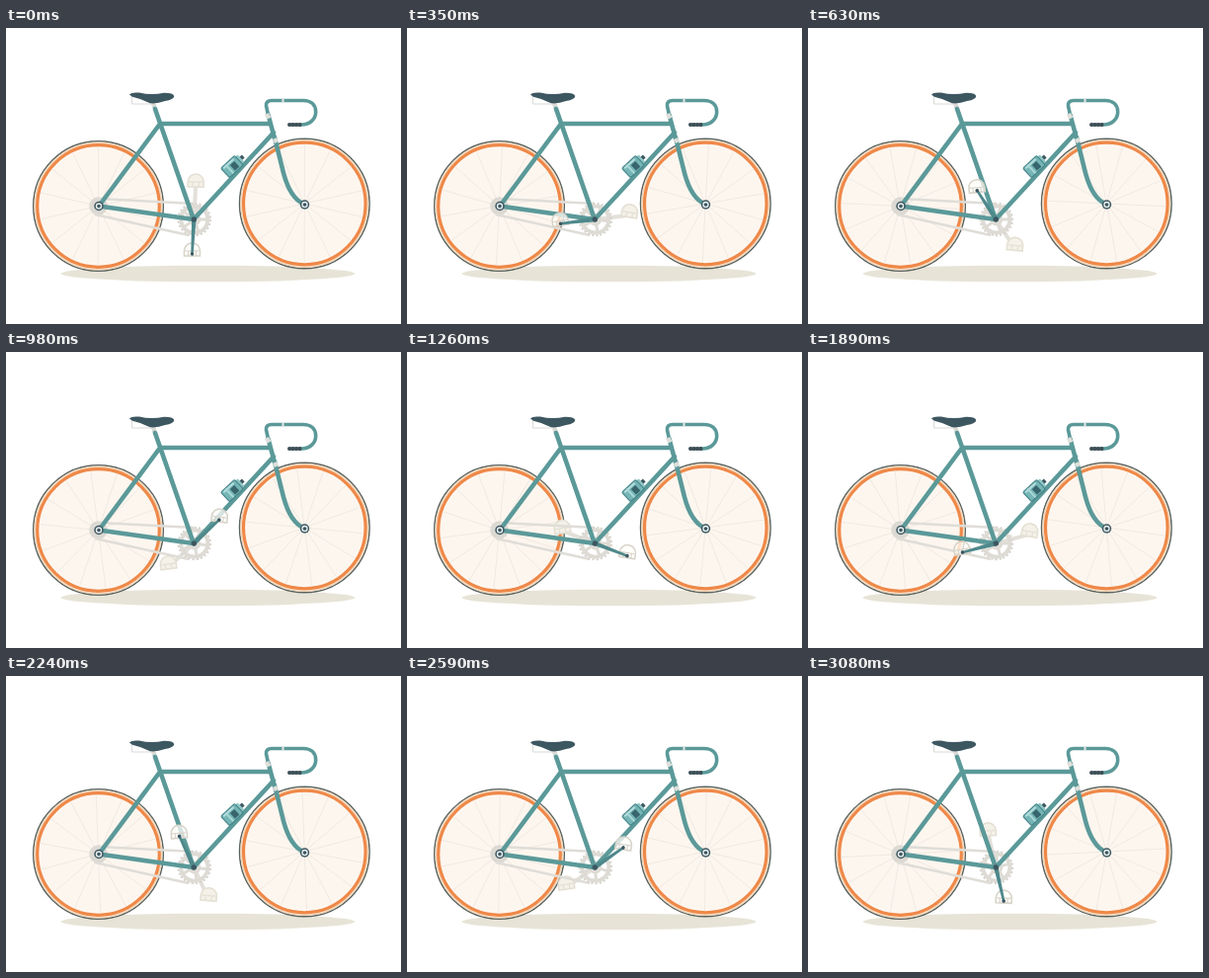
An HTML page that plays this animation: 400 px wide and 300 px high, repeating every 3.15 s.

```html
<!DOCTYPE html>
<html lang="en">
<head>
<meta charset="utf-8">
<title>Bicycle</title>
<style>
html, body { margin: 0; width: 100%; height: 100%; overflow: hidden; background: #fff; }
svg { display: block; width: 100vw; height: 100vh; }
.tube { fill: none; stroke: #5b9999; stroke-width: 4.6; stroke-linecap: round; stroke-linejoin: round; }
.chain { fill: none; stroke: #dfddd7; stroke-width: 2.6; }
.pale { fill: none; stroke: #e3e0da; stroke-width: 4; }
</style>
</head>
<body>
<svg viewBox="0 0 400 300">
  <defs>
    <g id="rim">
      <circle r="65.8" fill="#fdf6ef" stroke="#596360" stroke-width="1.5"/>
      <circle r="64.2" fill="none" stroke="#f3d9bd" stroke-width="1.7"/>
      <circle r="61.8" fill="none" stroke="#ef8848" stroke-width="3.2"/>
    </g>
    <g id="hub">
      <circle r="4.7" fill="#3d5761"/>
      <circle r="2.5" fill="none" stroke="#e8eeee" stroke-width="1.4"/>
    </g>
    <path id="dome" d="M-8 2V-3C-8-8-4-11 0-11S8-8 8-3V2Z"/>
  </defs>

  <ellipse cx="204.5" cy="249" rx="149" ry="8.3" fill="#e7e4d7"/>
  <use href="#rim" x="93.5" y="180.5"/>
  <use href="#rim" x="302.3" y="178"/>
  <g class="spokes" data-at="93.5 180.5"></g>
  <g class="spokes" data-at="302.3 178"></g>

  <g id="farCrank"><path class="pale" d="M0 0H35"/></g>
  <g id="farPedal">
    <use href="#dome" fill="#f4f1e9" stroke="#e5e0d4" stroke-width="1.6"/>
    <path d="M-7-3H7M-3-3V2M3-3V2" stroke="#e5e0d4" stroke-width="1.3"/>
  </g>

  <circle cx="93.5" cy="180.5" r="9.3" fill="#dcd9d3"/>
  <path class="chain" d="M94 173 190 178M90 189 185 210"/>
  <g id="ring">
    <circle r="16.2" fill="none" stroke="#d5d2cc" stroke-width="2" stroke-dasharray="2.1 2.14"/>
    <circle r="13.6" fill="none" stroke="#dedbd5" stroke-width="4"/>
    <circle r="6.5" fill="#dedbd5"/>
  </g>

  <path d="M127.5 69V77H147" fill="none" stroke="#d9d9d7"/>
  <path d="M149 76 151 82" stroke="#d9d9d5" stroke-width="4.5"/>
  <path class="tube" d="M151 82 190 194M156 97H268M156 97 94 180.5 190 194 271 106M265.5 88 272 112"/>
  <path class="tube" d="M272 111 281 147Q288 173 302 178.5"/>
  <path class="tube" style="stroke-width:3.6" d="M265.5 88 263.5 79Q263 73.5 269 73.5H301C309 73.5 313.7 78 313.7 85S308 98 299 98"/>
  <path d="M264 87 266.5 91.5M272 112 274 116" stroke="#dedfda" stroke-width="4.6"/>
  <path d="M279.5 73.5h2" stroke="#e6e9e6" stroke-width="3.6"/>
  <path d="M287 98H300" stroke="#3d4f57" stroke-width="4" stroke-linecap="round" stroke-dasharray="0 3.5"/>
  <path d="M287 98H299" stroke="#3d4f57" stroke-width="3.2"/>
  <path d="M125 67.5Q127 64.8 135 65.6 147 68.5 160 65.8 169 65.6 170.3 69 170 72.6 161 74 153 77 146 76.3 138 72 128 69.8Z" fill="#3d5761"/>

  <g transform="translate(230 139.5) rotate(47)">
    <path d="M-2-14H2V-10H-2Z" fill="#3d5761"/>
    <rect x="-5" y="-11" width="10" height="4" rx="1" fill="#8fc6c6"/>
    <rect x="-6.5" y="-8" width="13" height="19" rx="1.5" fill="#75b5b6" stroke="#438086"/>
    <path d="M-4.5-5V9" stroke="#b5dddd" stroke-width="2"/>
    <rect x="-2.5" y="-4" width="7.5" height="6" fill="#38656e"/>
    <path d="M-6 5H6" stroke="#a9d7d7" stroke-width="2"/>
  </g>

  <use href="#hub" x="94" y="180.5"/>
  <use href="#hub" x="302.5" y="179"/>

  <g id="nearPedal">
    <use href="#dome" fill="#fffdf9" fill-opacity=".75" stroke="#d8d4ca" stroke-width="1.6"/>
    <path d="M-7-3H7M-4-3V2M4-3V2" stroke="#d8d4ca" stroke-width="1.2"/>
  </g>
  <g id="nearCrank">
    <path d="M0-2.2 35-1.2V1.2L0 2.2Z" fill="#4e888b"/>
    <circle r="2.7" fill="#3d5761"/>
    <circle cx="35" r="1.8" fill="#3d5761"/>
  </g>
</svg>
<script>
const STEP = 70, LOOP = 3150, TURNS = 2;
const START = 93, ARM = 35, CX = 190.3, CY = 194;
const NS = 'http://www.w3.org/2000/svg';
const get = id => document.getElementById(id);
const wheels = document.querySelectorAll('.spokes');

function add(parent, name, attrs) {
  const el = document.createElementNS(NS, name);
  for (const key in attrs) el.setAttribute(key, attrs[key]);
  parent.append(el);
}

for (const wheel of wheels)
  for (let i = 0; i < 14; i++)
    add(wheel, 'path', { d: 'M4 0H60', stroke: '#efe9e2', 'stroke-width': 0.9, transform: `rotate(${i * 360 / 14})` });

for (let i = 0; i < 5; i++)
  add(get('ring'), 'path', { d: 'M5 0H13', stroke: '#dedbd5', 'stroke-width': 3, transform: `rotate(${i * 72})` });

function place(el, x, y, angle) {
  el.setAttribute('transform', `translate(${x} ${y}) rotate(${angle})`);
}

function placeArm(side, angle) {
  const a = angle * Math.PI / 180;
  place(get(side + 'Crank'), CX, CY, angle);
  place(get(side + 'Pedal'), CX + ARM * Math.cos(a), CY + ARM * Math.sin(a), 10 * Math.cos(a));
}

function draw(time) {
  const t = Math.floor(time % LOOP / STEP) * STEP;
  const turn = 360 * TURNS * t / LOOP;
  placeArm('near', START + turn);
  placeArm('far', START + 180 + turn);
  place(get('ring'), CX + 0.5, CY, turn);
  for (const wheel of wheels) place(wheel, ...wheel.dataset.at.split(' '), turn + 13);
}

const begin = performance.now();
function tick() {
  draw(performance.now() - begin);
  requestAnimationFrame(tick);
}
tick();
</script>
</body>
</html>
```
